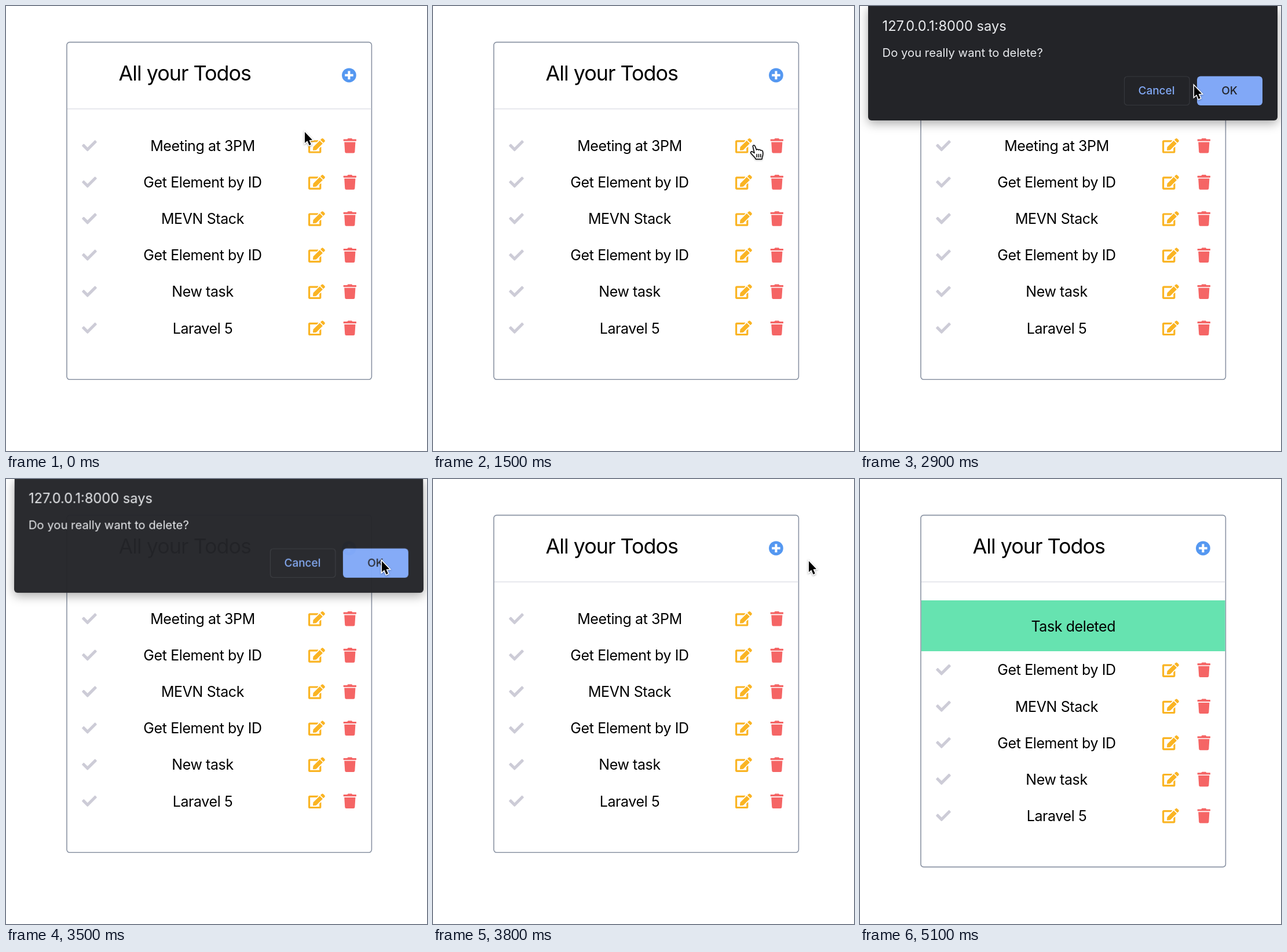
These frames come from a looping animation (727 px wide and 770 px high, 5.7 s). An HTML page:

```html
<!DOCTYPE html>
<html lang="en">
<head>
<meta charset="utf-8">
<title>Todos</title>
<style>
  html, body { margin: 0; width: 100%; height: 100%; overflow: hidden; background: #fff; }
  svg, #sheet { position: absolute; left: 0; top: 0; display: block; }
  text { font-family: Inter, "Liberation Sans", sans-serif; }
  .task { font-size: 25px; letter-spacing: -.4px; text-anchor: middle; }
  .button { font-size: 19px; font-weight: 500; text-anchor: middle; }
  #sheet { width: 727px; height: 770px; overflow: hidden; perspective: 800px; perspective-origin: 367.5px -40px; }
  #dialog {
    left: 14px; background: #232428; border-radius: 0 0 6px 6px;
    box-shadow: 0 5px 18px rgba(0, 0, 0, .35); transform-origin: 50% 100%;
  }
  #cursor { filter: drop-shadow(0 1.5px 1.5px rgba(0, 0, 0, .35)); }
</style>
</head>
<body>
<svg width="727" height="770">
  <defs>
    <path id="check" fill="#cdccd7" d="M174 439 8 273c-10-10-10-26 0-36l36-36c10-10 26-10 36 0l112 112L432 73c10-10 26-10 36 0l36 36c10 10 10 26 0 36L210 439c-10 10-26 10-36 0z"/>
    <path id="edit" fill="#fab423" d="M403 83l90 90c4 4 4 10 0 14L274 406l-92 10c-13 1-23-9-22-22l10-92L389 83c4-4 10-4 14 0zM565 60 516 12c-15-16-40-16-55 0l-36 35c-4 4-4 10 0 14l90 90c4 4 10 4 14 0l36-35c15-16 15-41 0-56zM384 346V448H64V128H294c3 0 6-1 8-3l40-40c8-8 3-21-8-21H48C21 64 0 85 0 112V464c0 27 21 48 48 48H400c27 0 48-21 48-48V306c0-11-13-16-20-8l-40 40c-3 2-4 5-4 8z"/>
    <path id="trash" fill="#f56565" d="M432 32H312l-9-19A24 24 0 0 0 281 0H167a24 24 0 0 0-22 13L136 32H16A16 16 0 0 0 0 48v32a16 16 0 0 0 16 16h416a16 16 0 0 0 16-16V48a16 16 0 0 0-16-16zM53 467a48 48 0 0 0 48 45h246a48 48 0 0 0 48-45L416 128H32z"/>
  </defs>
  <rect id="card" x="105" y="62.6" width="526.4" rx="5" fill="#fff" stroke="#8a93a3" stroke-width="1.6"/>
  <path d="M106 178H630.6" stroke="#dfe1e7" stroke-width="1.7"/>
  <text x="194.500" y="128.500" font-size="36" letter-spacing="-1.05">All your Todos</text>
  <circle cx="592.4" cy="119.8" r="12.4" fill="#5598f1"/>
  <path d="M585.2 119.800h14.4M592.4 112.600v14.4" stroke="#fff" stroke-width="4"/>
  <g id="rows"></g>
  <g id="notice">
    <path d="M106 210H630.6V298H106z" fill="#66e3b0"/>
    <text class="task" x="368.300" y="263.500">Task deleted</text>
  </g>
</svg>
<div id="sheet">
  <svg id="dialog" width="707" height="198">
    <g fill="#e8eaed">
      <text x="24.500" y="43" font-size="23.7">127.0.0.1:8000 says</text>
      <text x="24.500" y="88" font-size="20.3">Do you really want to delete?</text>
    </g>
    <rect x="442.500" y="122" width="112.500" height="49.500" rx="5" fill="none" stroke="#36383d" stroke-width="1.2"/>
    <text class="button" x="498" y="153" fill="#81a8f4">Cancel</text>
    <rect x="568" y="121.500" width="113" height="50.500" rx="6" fill="#81a8f7"/>
    <text class="button" x="624" y="153" fill="#232428">OK</text>
  </svg>
</div>
<svg width="727" height="770">
  <g id="cursor">
    <path id="arrow" d="M0 0V19L4.400 15.300 7.600 23 10.800 21.600 7.500 14.300 13 13.800z" stroke="#fff" stroke-width="3" paint-order="stroke"/>
    <g id="hand" transform="translate(-6.500 -1)" stroke="#000" stroke-width="1.5" stroke-linecap="round">
      <path fill="#fff" stroke-linejoin="round" d="M5.500 3.200C4.800 1 8 0 9 2.500L11.600 9C12.500 7.500 14.500 7.500 15.200 9.200 16 8 18.200 8.200 18.800 10 20 9.200 22 10 22.400 12 23 15.500 23 18 21.600 21L21 25H10.500C9.500 22 5 18.500 2.200 15 .5 12.800 3 11 5 12.500L8 14.500z"/>
      <path d="M12.200 16.500v5M15.500 16.500v5M18.800 16.500v5"/>
    </g>
  </g>
</svg>
<script>
const LOOP = 5700, STEP = 100, ROW = 63.1;
const tasks = ['Meeting at 3PM', 'Get Element by ID', 'MEVN Stack', 'Get Element by ID', 'New task', 'Laravel 5'];

// Keys: [time, value, ...]
const pointer = [
  [0, 516, 218], [600, 530, 237], [900, 530, 237], [1500, 553.5, 241], [2000, 598, 240], [2600, 598, 240],
  [2700, 594, 214], [2800, 582, 165], [2900, 577, 138], [3000, 588, 130], [3200, 637, 137], [3300, 649, 142]
];
const opening = [
  [2100, 0], [2200, .15], [2300, .6], [2400, .86], [2500, .97], [2600, 1],
  [3400, 1], [3500, .97], [3600, .82], [3700, .35], [3800, 0]
];

const $ = id => document.getElementById(id);
const show = (id, on) => $(id).style.display = on ? '' : 'none';

function valueAt(keys, t) {
  const next = keys.findIndex(key => key[0] > t);
  if (next < 0) return keys[keys.length - 1].slice(1);
  if (next === 0) return keys[0].slice(1);
  const a = keys[next - 1], b = keys[next], k = (t - a[0]) / (b[0] - a[0]);
  return a.slice(1).map((v, i) => v + (b[i + 1] - v) * k);
}

const icon = (name, x) => `<use href="#${name}" transform="translate(${x} 229) scale(.05)"/>`;
$('rows').innerHTML = tasks.map((task, i) =>
  `<g transform="translate(0 ${i * ROW})">${icon('check', 131.2)}${icon('edit', 522)}${icon('trash', 582.6)}
   <text class="task" x="339.500" y="251">${task}</text></g>`).join('');

function draw(t) {
  const deleted = t >= 4300;
  $('card').setAttribute('height', deleted ? 608.8 : 583.7);
  $('rows').setAttribute('transform', `translate(0 ${deleted ? 25.3 : 0})`);
  $('rows').firstElementChild.style.display = deleted ? 'none' : '';
  show('notice', deleted);

  const [open] = valueAt(opening, t);
  show('sheet', open > 0);
  $('dialog').style.opacity = open;
  $('dialog').style.transform = open < 1
    ? `translateY(${-38 * (1 - open)}px) rotateX(${17.5 * (1 - open)}deg)` : 'none';

  const [x, y] = valueAt(pointer, t);
  const overLink = t < 2200 && (x >= 522 && x < 557 || x >= 582);
  show('cursor', t < 3900);
  show('hand', overLink);
  show('arrow', !overLink);
  $('cursor').setAttribute('transform', `translate(${x} ${y})`);
}

function tick() {
  draw(Math.floor(performance.now() % LOOP / STEP) * STEP);
  requestAnimationFrame(tick);
}
tick();
</script>
</body>
</html>
```
